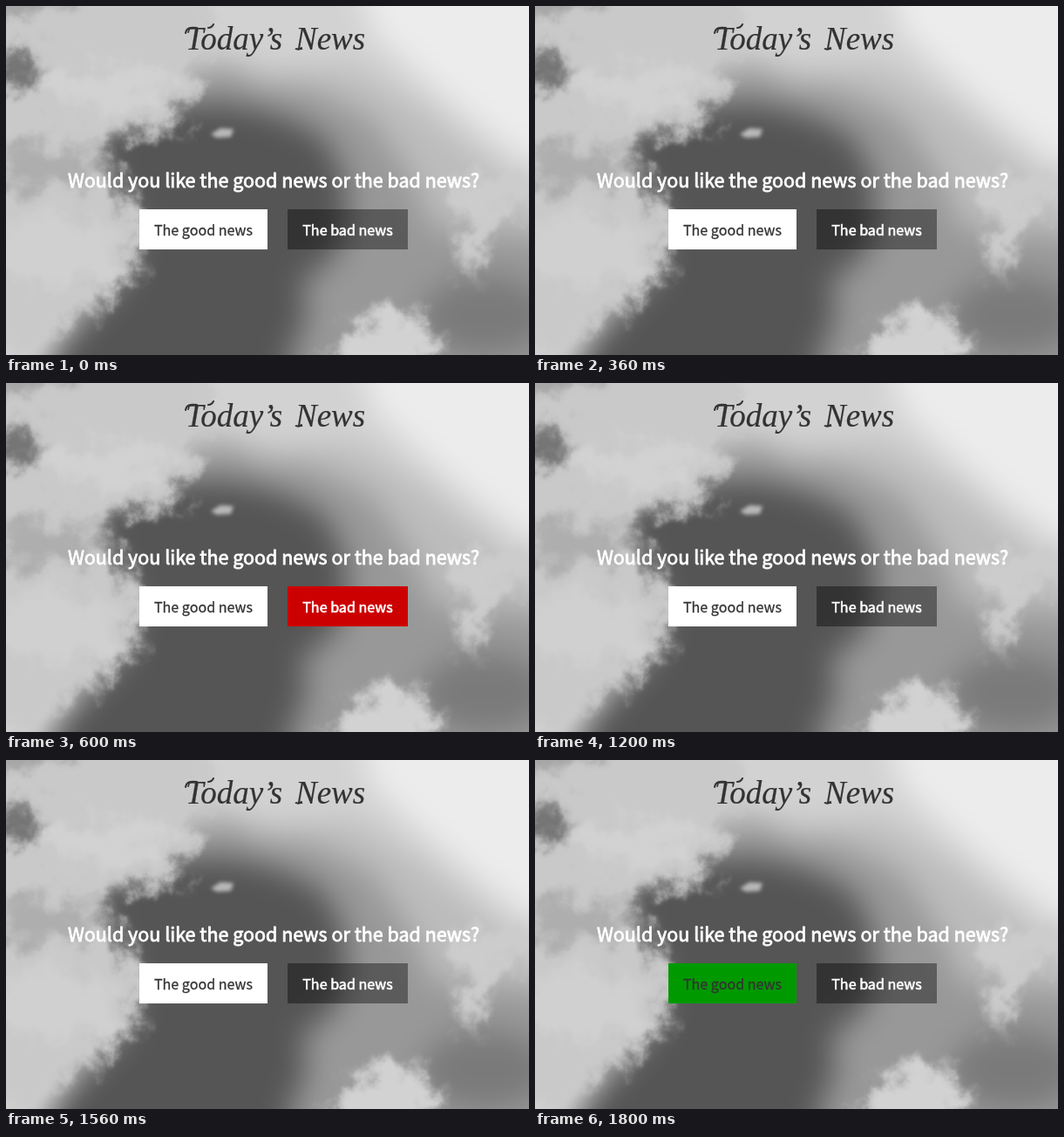
An HTML page for the animation above (2400 ms loop, 600 by 400 pixels).

```html
<!DOCTYPE html>
<html lang="en">
<head>
<meta charset="utf-8">
<title>Today’s News</title>
<style>
  html, body { margin: 0; width: 100%; height: 100%; overflow: hidden; background: #aaa; }
  svg { display: block; width: 600px; height: 400px; overflow: hidden; }
  text { font-family: "Noto Sans CJK SC", "Noto Sans CJK JP", "Noto Sans CJK", "Open Sans", sans-serif; }
  .title { font: italic 37px "Liberation Serif", serif; fill: #333; stroke: #333; stroke-width: .2px; }
  .swash { fill: none; stroke: #333; stroke-width: 2px; stroke-linecap: round; }
  .ask { font-size: 21.5px; fill: #fff; stroke: #fff; stroke-width: .8px; text-anchor: middle; }
  .label { font-size: 16.1px; text-anchor: middle; }
  .dark { fill: #333; stroke: #333; stroke-width: .3px; }
  .light { fill: #fff; stroke: #fff; stroke-width: .6px; }
  .good { fill: #fff; animation: good 2.4s step-end infinite; }
  .bad { fill: rgba(0, 0, 0, .4); animation: bad 2.4s step-end infinite; }
  @keyframes good {
    0% { fill: #fff; }
    75%, 100% { fill: #090; }
  }
  @keyframes bad {
    0% { fill: rgba(0, 0, 0, .4); }
    25% { fill: #c00; }
    50%, 100% { fill: rgba(0, 0, 0, .4); }
  }
</style>
</head>
<body>
<svg viewBox="0 0 600 400">
  <defs>
    <filter id="haze" filterUnits="userSpaceOnUse" x="-60" y="-60" width="720" height="520" color-interpolation-filters="sRGB">
      <feGaussianBlur stdDeviation="17"/>
    </filter>
    <!-- Soft shapes with edges torn by noise -->
    <filter id="cloud" filterUnits="userSpaceOnUse" x="-60" y="-60" width="720" height="520" color-interpolation-filters="sRGB">
      <feTurbulence type="fractalNoise" baseFrequency=".03" numOctaves="6" seed="8" result="noise"/>
      <feGaussianBlur in="SourceGraphic" stdDeviation="8" result="soft"/>
      <feDisplacementMap in="soft" in2="noise" scale="60" xChannelSelector="R" yChannelSelector="G"/>
    </filter>
    <filter id="wisp" x="-50%" y="-50%" width="200%" height="200%">
      <feGaussianBlur stdDeviation="2"/>
    </filter>
  </defs>

  <g filter="url(#haze)">
    <rect x="-100" y="-100" width="800" height="600" fill="#d2d2d2"/>
    <path fill="#bcbcbc" d="M180 50 300 75 400 70 480 120 560 185 640 260V500H60V90Z"/>
    <path fill="#989898" d="M190 100 250 65 290 90 350 95 420 130 465 195 490 255 610 265 700 300V500H0L100 340V150Z"/>
    <path fill="#555" d="M90 145 200 112 260 112 315 125 365 150 390 200 390 255 375 290 340 315 345 360 325 400V500H10L60 390 140 310 150 250Z"/>
    <path fill="#ececec" d="M390-90H700V180H600L545 140 480 85 420 30Z"/>
    <ellipse cx="550" cy="355" rx="75" ry="45" fill="#7a7a7a"/>
  </g>

  <g filter="url(#cloud)">
    <path fill="#c9c9c9" d="M-90-90H235L225 60 208 112 188 140 155 143 105 155 125 205 158 260 160 295 125 322 90 352 40 395-90 400Z"/>
    <ellipse cx="45" cy="185" rx="65" ry="24" fill="#aeaeae"/>
    <ellipse cx="120" cy="92" rx="75" ry="24" fill="#d2d2d2"/>
    <ellipse cx="60" cy="280" rx="72" ry="42" fill="#d0d0d0"/>
    <ellipse cx="12" cy="76" rx="26" ry="20" fill="#747474"/>
    <ellipse cx="15" cy="-5" rx="55" ry="18" fill="#a6a6a6"/>
    <path fill="#ccc" d="M520 195 610 190 585 235 556 250 538 312 522 290Z"/>
    <path fill="#d2d2d2" d="M370 405 395 372 440 345 478 355 490 400 495 480H360Z"/>
  </g>
  <path fill="#b8b8b8" filter="url(#wisp)" d="M235 147 246 140 261 141 258 150 242 151Z"/>

  <path class="swash" d="M206 31C207 25 211 24 219 25M232 25Q236 25 238 21M333 49Q336 51 339 48"/>
  <text class="title" x="206" y="50">Today’s</text>
  <text class="title" x="332" y="50">News</text>
  <text class="ask" x="307" y="208">Would you like the good news or the bad news?</text>

  <rect class="good" x="153" y="233" width="147" height="46"/>
  <text class="label dark" x="226.5" y="263">The good news</text>
  <rect class="bad" x="323" y="233" width="138" height="46"/>
  <text class="label light" x="392" y="263">The bad news</text>
</svg>
</body>
</html>
```
